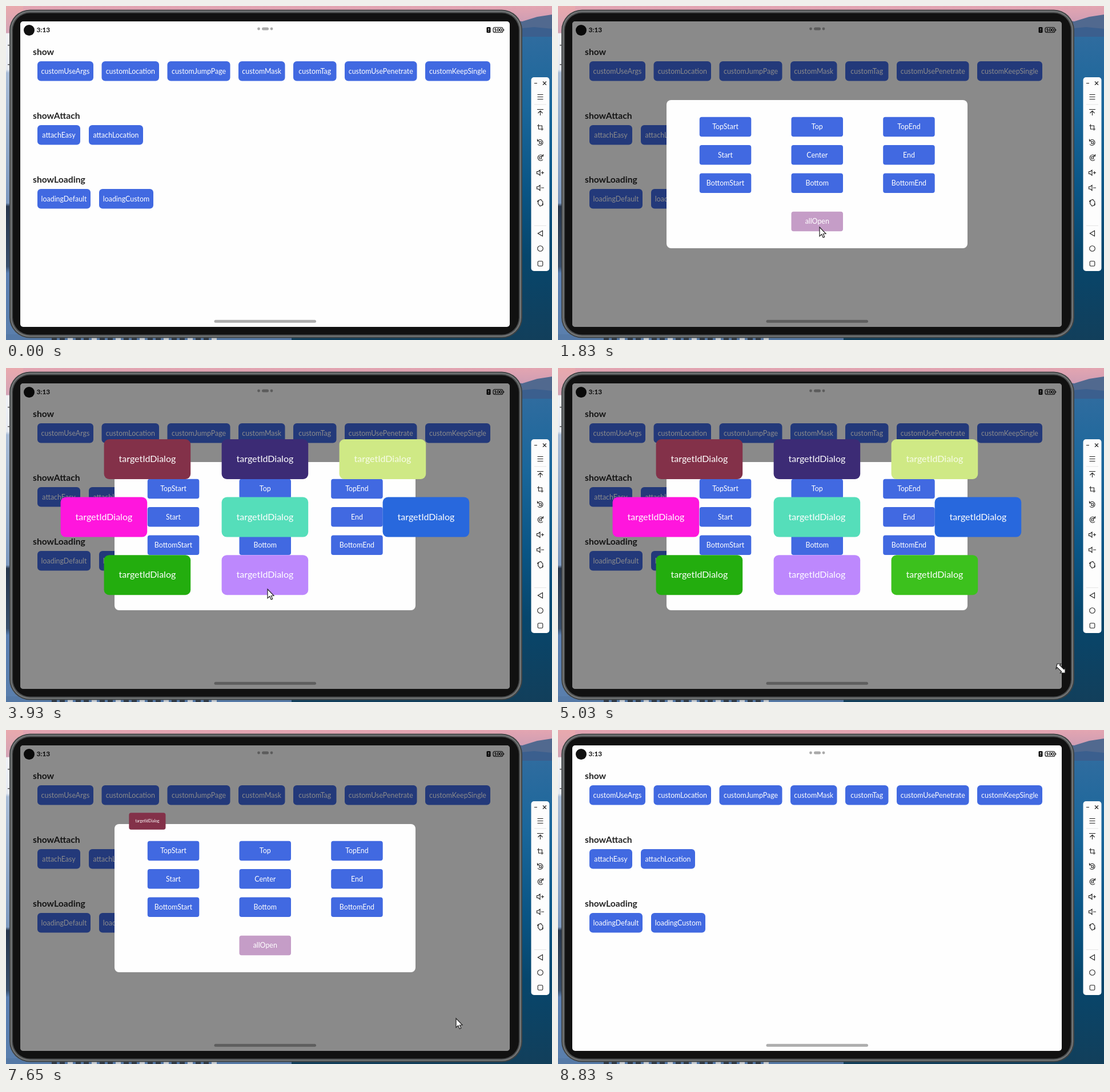
An HTML page with a canvas for the animation above (9.26 s loop, 956 px wide and 586 px high).

```html
<!DOCTYPE html>
<html lang="en">
<head>
<meta charset="utf-8">
<title>Dialog demo</title>
<style>
html, body { margin: 0; width: 100%; height: 100%; overflow: hidden; }
canvas { display: block; }
</style>
</head>
<body>
<canvas id="stage" width="956" height="586"></canvas>
<script>
const c = document.getElementById('stage').getContext('2d');
const LOOP = 9260, GROW = 165, BLUE = '#4169e1';
const OPEN_MAIN = 871, CLOSE_MAIN = 8567;
const OPEN_FIRST = 1996, OPEN_STEP = 246;
const CLOSE_FIRST = 5520, CLOSE_STEP = 255;

// rows of home buttons: heading, top, then [label, x, width]
const home = [
  ['show', 97, ['customUseArgs', 55, 98], ['customLocation', 167.5, 100.5], ['customJumpPage', 282.5, 110],
    ['customMask', 407, 81.5], ['customTag', 503, 75.5], ['customUsePenetrate', 593, 126.5], ['customKeepSingle', 734, 114]],
  ['showAttach', 209, ['attachEasy', 55, 75], ['attachLocation', 145, 95]],
  ['showLoading', 321, ['loadingDefault', 55, 93], ['loadingCustom', 163, 95]]
];
const places = ['TopStart', 'Top', 'TopEnd', 'Start', 'Center', 'End', 'BottomStart', 'Bottom', 'BottomEnd'];
const colors = ['#833149', '#3c2b75', '#cfe985', '#ff16dd', '#55deba', '#2868dd', '#23ad0e', '#bd88fd', '#3cc11d'];

// pointer keys: time, x, y, easing towards this key
const smooth = u => u * u * (3 - 2 * u), speedUp = u => u * u, slowDown = u => 1 - (1 - u) ** 2;
const path = [
  [30, 330, 600], [620, 196, 228, slowDown], [830, 196, 228], [960, 344, 342, speedUp],
  [1400, 458, 388, slowDown], [4130, 458, 388], [4730, 882, 527], [5030, 882, 527],
  [5100, 884, 529], [5180, 868, 531], [5340, 788, 506], [8550, 788, 506],
  [8610, 803, 525, speedUp], [8820, 840, 600, slowDown]
];
// pointer presses: start, end
const presses = [[750, 850], [1880, 1980], [5360, CLOSE_FIRST], [8450, 8560]];
for (let i = 1; i < 9; i++) {
  const end = CLOSE_FIRST + i * CLOSE_STEP;
  presses.push([end - 100, end]);
}

const progress = (t, start) => smooth(Math.min(1, Math.max(0, (t - start) / GROW)));
const size = (t, open, close) => progress(t, open) - progress(t, close);

function box(x, y, w, h, r, fill) {
  c.beginPath();
  c.roundRect(x, y, w, h, r);
  c.fillStyle = fill;
  c.fill();
}
function disc(x, y, r, fill) {
  c.beginPath();
  c.arc(x, y, r, 0, 7);
  c.fillStyle = fill;
  c.fill();
}
function text(s, x, y, px, fill = '#fff', align = 'center', weight = 400) {
  c.font = `${weight} ${px}px Lato, "Open Sans", sans-serif`;
  c.textAlign = align;
  c.fillStyle = fill;
  c.fillText(s, x, y);
}
function button(s, x, y, w, r = 6, fill = BLUE) {
  box(x, y, w, 34.5, r, fill);
  text(s, x + w / 2, y + 21.5, 12.4);
}
function fade(x0, y0, x1, y1, ...stops) {
  const g = c.createLinearGradient(x0, y0, x1, y1);
  stops.forEach(([at, color]) => g.addColorStop(at, color));
  return g;
}
function line(d, width = 1.1, color = '#222') {
  c.strokeStyle = color;
  c.lineWidth = width;
  c.stroke(new Path2D(d));
}
function scaled(x, y, s, draw) {
  if (s <= 0) return;
  c.save();
  c.translate(x, y);
  c.scale(s, s);
  draw();
  c.restore();
}

function wallpaper() {
  box(0, 0, 956, 586, 0, fade(0, 0, 0, 586, [0, '#e3a5b1'], [.06, '#c99bb4'], [.09, '#2f6c9f'],
    [.3, '#1a679b'], [.55, '#0a5585'], [.75, '#07466c'], [1, '#123f5b']));
  c.fillStyle = '#51698f';
  c.fill(new Path2D('M840 20L904 27L930 19L956 15V48H840Z'));
  c.fillStyle = '#3b5f8e';
  c.fill(new Path2D('M890 40L925 37L956 40V54H890Z'));
  box(0, 0, 30, 586, 0, fade(0, 0, 0, 586, [0, '#e9a9ad'], [.08, '#d3a4b6'], [.083, '#f1f3f7'],
    [.19, '#e6eaf2'], [.2, '#a9bdd7'], [.59, '#7d99bf'], [.6, '#27364b'], [.78, '#3a506c'], [.8, '#5c80b2'], [1, '#5a7fad']));
  box(3, 68, 3, 1.5, 0, '#555');
  box(3, 102, 3, 1.5, 0, '#555');
  box(0, 576, 500, 10, 0, '#5579a6');
  for (let x = 80; x < 370; x += 14) box(x, 580, 9, 6, 0, x % 3 ? '#303a46' : '#c4cad1');
}

function device() {
  box(6, 6.5, 898, 576, 36, '#414445');
  box(8, 8.5, 894, 572, 34, '#777a7b');
  box(10, 10.5, 890, 568, 32, '#4b4d4e');
  box(12, 12.5, 886, 564, 30, '#111');
}

function homeScreen() {
  box(25, 27, 857, 536, 5, '#fefefe');
  disc(40.5, 42.5, 9.5, '#111');
  text('3:13', 53.5, 46, 11.8, '#111', 'left', 700);
  disc(442.5, 40, 2.4, '#aaa');
  disc(465, 40, 2.4, '#aaa');
  box(448, 37.5, 12, 5, 2.5, '#aaa');
  box(841.5, 37, 7, 10, 1.5, '#111');
  box(844.4, 39, 1.3, 3.6, 0, '#fff');
  box(844.4, 43.8, 1.3, 1.3, 0, '#fff');
  c.beginPath();
  c.roundRect(853, 37.5, 17, 9, 3);
  c.strokeStyle = '#111';
  c.lineWidth = 1.2;
  c.stroke();
  box(871, 40.5, 1.2, 3, .5, '#111');
  text('100', 861.5, 45.3, 8.2, '#111', 'center', 900);
  for (const [title, y, ...items] of home) {
    text(title, 47, y - 11, 15.7, '#252525', 'left', 700);
    for (const [s, x, w] of items) button(s, x, y, w);
  }
  box(364.5, 550.7, 178.5, 5, 2.5, '#adadad');
}

function mainDialog() {
  box(-263.5, -130, 527, 260, 8, '#fefefe');
  places.forEach((s, i) =>
    button(s, -205.7 + i % 3 * 160.7, -100.3 + Math.floor(i / 3) * 49.4, 90.5, 4));
  button('allOpen', -45, 65.7, 90.5, 4, '#c59dc7');
}

function attachedDialog(i, s) {
  const col = i % 3 - 1, row = Math.floor(i / 3) - 1;
  scaled(453.4 + col * (row ? 206 : 282), 261.6 + row * 101.6, s, () => {
    box(-75.8, -35, 151.6, 70, 9, colors[i]);
    text('targetIdDialog', 0, 5, 16, i == 2 ? '#f8fce8' : '#fff');
  });
}

function toolbar() {
  box(919.5, 125, 32, 340, 5, '#fdfdfd');
  line('M925 172.8H946M925 385.3H946', 1, '#e3e3e3');
  line('M925 135.5h5M940 132.5l6 6M946 132.5l-6 6');
  line('M930.5 155.5h10M930.5 159.5h10M930.5 163.5h10');
  line('M930 181.5h11M935.5 192v-8M931.5 188l4-4l4 4');
  line('M932.5 207.5v8.5h8.5M930 210h8.5v8.5');
  line('M931 236.5a5 5 0 1 1 0 6M930.5 233.5v3.5h3.5M934 238h3.5v3.5h-3.5z');
  line('M940 263a5 5 0 1 0 0 6.5M940.5 260v3.5h-3.5M934 264.5h3.5v3.5h-3.5z');
  for (const y of [292.5, 319]) line(`M929.5 ${y - 2}h2.3l3.2 -2.5v9l-3.2 -2.5h-2.3zM937 ${y}h5`);
  line('M939.5 290v5');
  line('M932.5 341l4-1.5l3.5 4.5l-1 5.5l-4 1.5l-3.5-4.5zM930.5 344l1-3M940.5 346.5l-1 3.5');
  line('M939.5 394.3v9.4l-8.2 -4.7z');
  line('M930.7 425.5a4.8 4.8 0 1 0 9.6 0a4.8 4.8 0 1 0 -9.6 0');
  c.beginPath();
  c.roundRect(931.2, 447.7, 8.6, 8.6, 1.8);
  c.stroke();
}

function pointer(t) {
  const k = path.findIndex(p => p[0] > t);
  if (k < 1) return;
  const [t0, x0, y0] = path[k - 1], [t1, x1, y1, ease = smooth] = path[k];
  const u = ease((t - t0) / (t1 - t0));
  const x = x0 + (x1 - x0) * u, y = y0 + (y1 - y0) * u;
  if (presses.some(([a, b]) => t >= a && t < b)) disc(x, y, 14, 'rgba(255,255,0,.5)');
  const resize = x > 868;
  const shape = new Path2D(resize
    ? 'M-8 -8h6.5l-2.2 2.2l7.5 7.5l2.2 -2.2v8.5h-8.5l2.2 -2.2l-7.5 -7.5l-2.2 2.2z'
    : 'M0 0V16L3.7 12.6L6.2 18.2L8.7 17.1L6.3 11.7L11 11.5Z');
  c.save();
  c.translate(x, y);
  c.lineWidth = 1.2;
  c.strokeStyle = '#222';
  c.fillStyle = '#fff';
  c.fill(shape);
  c.stroke(shape);
  c.restore();
}

function draw(now) {
  const t = now % LOOP;
  const main = size(t, OPEN_MAIN, CLOSE_MAIN);
  wallpaper();
  device();
  homeScreen();
  box(25, 27, 857, 536, 5, `rgba(0,0,0,${.46 * main})`);
  // the status bar icons stay undimmed black; dialogs sit above the mask
  scaled(453.5, 295, main, mainDialog);
  for (let i = 0; i < 9; i++)
    attachedDialog(i, size(t, OPEN_FIRST + i * OPEN_STEP, CLOSE_FIRST + (8 - i) * CLOSE_STEP));
  toolbar();
  pointer(t);
}

const start = performance.now();
(function tick() {
  draw(performance.now() - start);
  requestAnimationFrame(tick);
})();
</script>
</body>
</html>
```
